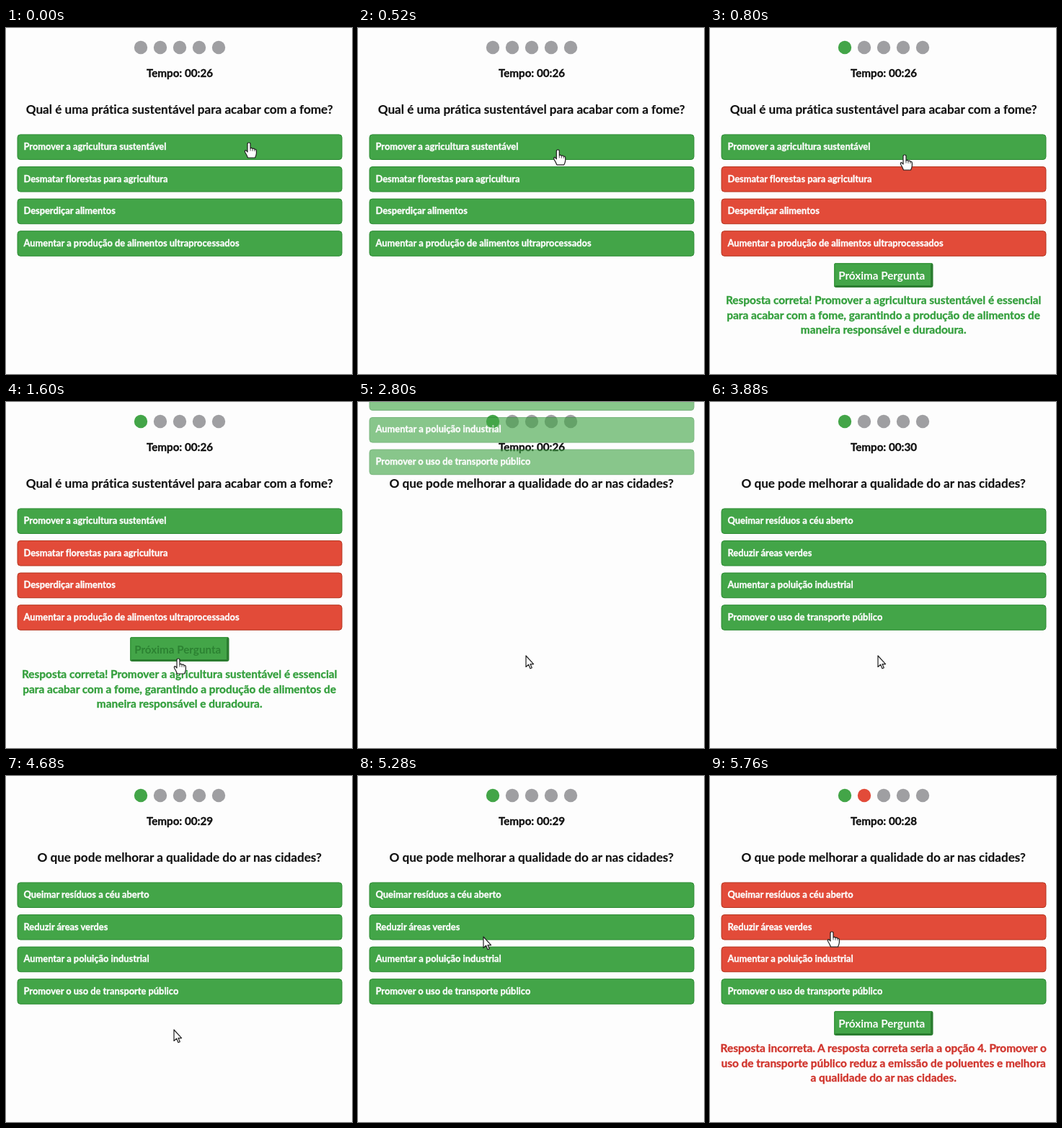
An HTML page that plays this animation: 480 px wide and 480 px high, repeating every 5.8 s.

```html
<!DOCTYPE html>
<html lang="pt">
<head>
<meta charset="utf-8">
<title>Quiz</title>
<style>
  html, body { margin: 0; width: 100%; height: 100%; overflow: hidden; background: #fdfdfd; }
  svg { display: block; width: 100vw; height: 100vh; }
  text { font-family: Lato, "Open Sans", sans-serif; font-weight: 700; font-variant-ligatures: none; }
  .mid { text-anchor: middle; }
  .dark { fill: #111; stroke: #111; }
  .option { font-size: 12.85px; fill: #fdfdfd; stroke: #fdfdfd; }
  .bold { stroke-width: .35px; }
  .title { font-size: 17.15px; stroke-width: .15px; }
</style>
</head>
<body>
<svg id="stage" viewBox="0 0 480 480"></svg>
<script>
const LOOP = 5800;
const ANSWER_1 = 560, HOVER_NEXT = 1440, NEXT = 2400, DROP = 2440, ANSWER_2 = 5520;
const GREEN = '#43a548', GREEN_EDGE = '#2c8a33', RED = '#e24b39', RED_EDGE = '#b5351f', GRAY = '#9f9fa2';

const questions = [
  {
    title: 'Qual é uma prática sustentável para acabar com a fome?',
    options: ['Promover a agricultura sustentável', 'Desmatar florestas para agricultura',
      'Desperdiçar alimentos', 'Aumentar a produção de alimentos ultraprocessados'],
    correct: 0,
    color: '#339f3c',
    feedback: ['Resposta correta! Promover a agricultura sustentável é essencial',
      'para acabar com a fome, garantindo a produção de alimentos de',
      'maneira responsável e duradoura.']
  },
  {
    title: 'O que pode melhorar a qualidade do ar nas cidades?',
    options: ['Queimar resíduos a céu aberto', 'Reduzir áreas verdes',
      'Aumentar a poluição industrial', 'Promover o uso de transporte público'],
    correct: 3,
    color: '#d0342c',
    feedback: ['Resposta incorreta. A resposta correta seria a opção 4. Promover o',
      'uso de transporte público reduz a emissão de poluentes e melhora',
      'a qualidade do ar nas cidades.']
  }
];

// Pointer tip: time, x, y
const pointerPath = [
  [0, 337, 159], [120, 335, 160], [560, 276, 169], [800, 270, 176], [1440, 241, 351],
  [1600, 239, 356], [2000, 238, 355], [2380, 233, 352], [4840, 233, 352],
  [5280, 174, 223], [5420, 169, 216], [LOOP, 169, 216]
];

const stage = document.getElementById('stage');

function add(parent, tag, attrs = {}) {
  const node = document.createElementNS('http://www.w3.org/2000/svg', tag);
  set(node, attrs);
  return parent.appendChild(node);
}
function set(node, attrs) {
  for (const key in attrs) node.setAttribute(key, attrs[key]);
}
function show(node, visible) {
  node.setAttribute('visibility', visible ? 'visible' : 'hidden');
}
const clamp = v => Math.min(1, Math.max(0, v));

// CSS "ease" curve
function ease(x) {
  x = clamp(x);
  let low = 0, high = 1;
  for (let i = 0; i < 24; i++) {
    const u = (low + high) / 2;
    const bx = 0.75 * u * (1 - u) + u ** 3;
    if (bx < x) low = u; else high = u;
  }
  const u = (low + high) / 2;
  return 0.3 * u * (1 - u) ** 2 + 3 * u * u * (1 - u) + u ** 3;
}

function pointerAt(t) {
  const i = pointerPath.findIndex(p => p[0] > t);
  const [t0, x0, y0] = pointerPath[i - 1], [t1, x1, y1] = pointerPath[i];
  let k = (t - t0) / (t1 - t0);
  k = k * k * (3 - 2 * k);
  return [x0 + (x1 - x0) * k, y0 + (y1 - y0) * k];
}

add(stage, 'rect', { width: 480, height: 480, fill: '#fdfdfd' });
const dots = [0, 1, 2, 3, 4].map(i => add(stage, 'circle', { cx: 187 + 27 * i, cy: 27, r: 9.2 }));
const timer = add(stage, 'text', { class: 'mid dark bold', x: 241, y: 68.2, 'font-size': 15.2 });
const title = add(stage, 'text', { class: 'mid dark title', x: 240.7, y: 118.8 });

const optionGroup = add(stage, 'g');
const options = [0, 1, 2, 3].map(i => {
  const y = 147.9 + 44.6 * i;
  return {
    box: add(optionGroup, 'rect', { x: 16, y, width: 450, height: 34.6, rx: 4 }),
    label: add(optionGroup, 'text', { class: 'option bold', x: 24.5, y: y + 21 })
  };
});

const result = add(stage, 'g');
add(result, 'rect', { x: 172, y: 326, width: 137.5, height: 34, rx: 3, fill: '#2b7d30' });
add(result, 'path', { d: 'M174 326H308L306 329V357H175L172 359V328Z', fill: '#3c9a41' });
add(result, 'rect', { x: 174, y: 328, width: 132, height: 29, fill: GREEN });
const nextLabel = add(result, 'text', { class: 'mid', x: 238.2, y: 349, 'font-size': 15.2 });
nextLabel.textContent = 'Próxima Pergunta';
const feedback = [0, 1, 2].map(i =>
  add(result, 'text', { class: 'mid bold', x: 240.7, y: 383 + 20.5 * i, 'font-size': 15.4 }));

const pointer = add(stage, 'g', { fill: '#fdfdfd', stroke: '#222', 'stroke-width': 1.2, 'stroke-linejoin': 'round' });
const arrow = add(pointer, 'path', { d: 'M0 0V15.5L3.6 12.2 6 17.8 8.3 16.8 6 11.6H10.6Z' });
const hand = add(pointer, 'g');
add(hand, 'path', {
  d: 'M-2 2Q-2 0 0 0Q2 0 2 2V8Q4 6.6 5 8.6Q7 7.4 8 9.4Q10 8.8 10.4 11V15Q10 18 8.5 21H-1.5Q-3 17-5 14Q-6.5 11-4.6 10.6Q-3 11-2 13Z'
});
add(hand, 'path', { d: 'M2 8V11.5M5 8.8V11.8M8 9.6V12', fill: 'none', 'stroke-width': .8 });

function render(t) {
  const second = t >= NEXT;
  const question = questions[second ? 1 : 0];
  const answered = second ? t >= ANSWER_2 : t >= ANSWER_1;

  dots.forEach((dot, i) => {
    const color = i === 0 && t >= ANSWER_1 ? GREEN : i === 1 && t >= ANSWER_2 ? RED : GRAY;
    set(dot, { fill: color });
  });

  const ticks = Math.floor((t - DROP) / 1000);
  timer.textContent = 'Tempo: 00:' + (ticks < 1 ? 26 : 31 - ticks);
  title.textContent = question.title;

  options.forEach(({ box, label }, i) => {
    const wrong = answered && i !== question.correct;
    set(box, { fill: wrong ? RED : GREEN, stroke: wrong ? RED_EDGE : GREEN_EDGE });
    label.textContent = question.options[i];
  });
  const drop = second ? ease((t - DROP) / 1000) : 1;
  set(optionGroup, { opacity: drop, transform: `translate(0 ${-572 * (1 - drop)})` });

  show(result, answered);
  feedback.forEach((line, i) => {
    line.textContent = question.feedback[i];
    set(line, { fill: question.color, stroke: question.color });
  });
  const hover = second ? 0 : ease((t - HOVER_NEXT) / 150);
  const mix = (from, to) => Math.round(from + (to - from) * hover);
  set(nextLabel, { fill: `rgb(${mix(253, 44)},${mix(253, 130)},${mix(253, 50)})` });

  const [x, y] = pointerAt(t);
  set(pointer, { transform: `translate(${x} ${y})` });
  const isArrow = second && t < 5340;
  show(arrow, isArrow);
  show(hand, !isArrow);
}

const start = performance.now();
function frame() {
  render((performance.now() - start) % LOOP);
  requestAnimationFrame(frame);
}
render(0);
requestAnimationFrame(frame);
</script>
</body>
</html>
```
